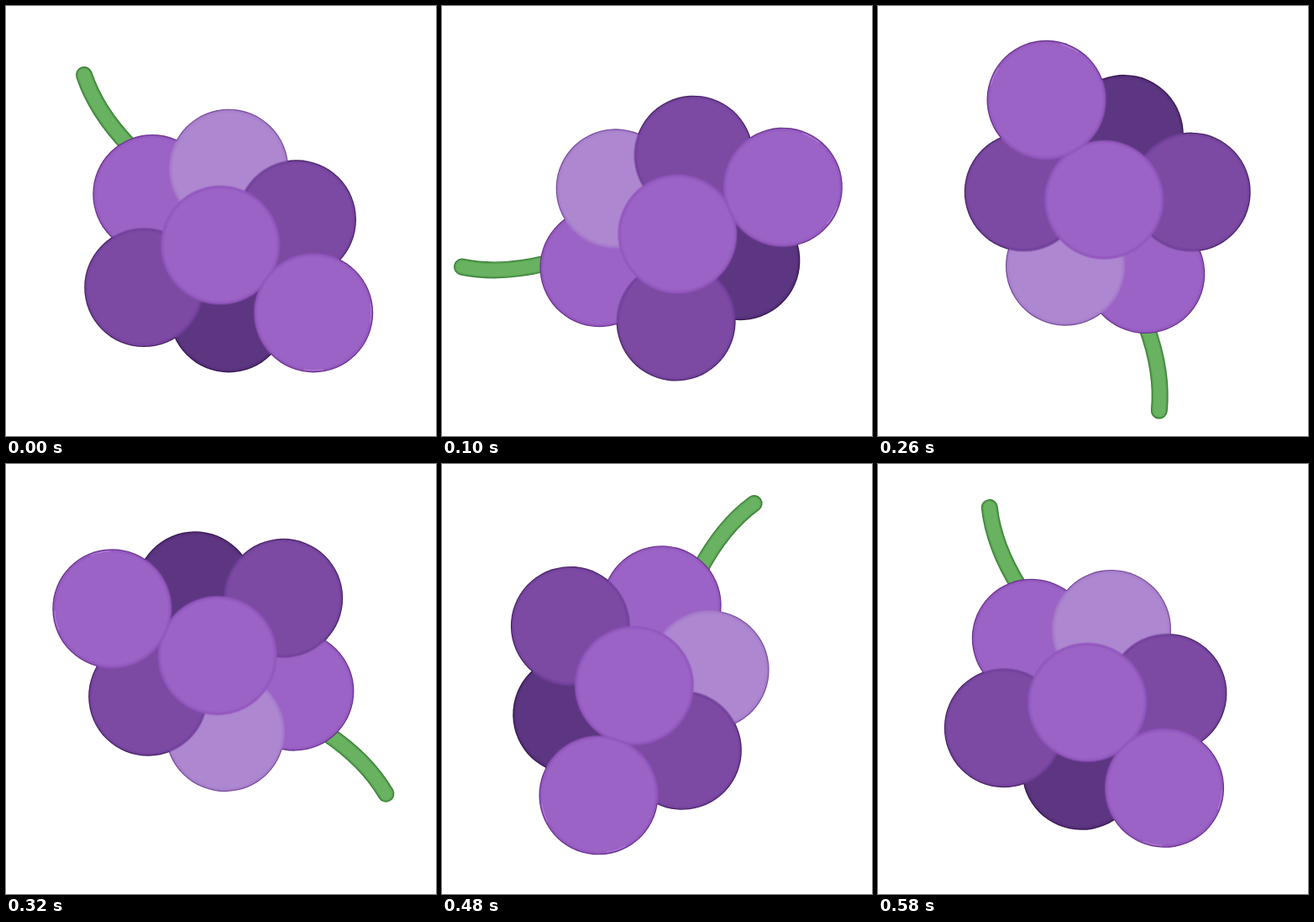
An HTML page with a canvas that plays this animation: 512x512 px, repeating every 600 ms.

```html
<!DOCTYPE html>
<html lang="en">
<head>
<meta charset="utf-8">
<title>Spinning grapes</title>
<style>
  html, body { margin: 0; width: 100%; height: 100%; overflow: hidden; background: #fff; }
  canvas { display: block; width: 100vw; height: 100vh; }
</style>
</head>
<body>
<canvas id="stage" width="512" height="512"></canvas>
<script>
const ctx = document.getElementById('stage').getContext('2d');

const LOOP = 600, STEP = 20;
const PIVOT = { x: 256.4, y: 256.2 };
const HUB = { x: -1.3, y: 28.4 };   // middle grape, relative to the pivot
const UNIT = 10.1, RADIUS = 71;

const tones = {
  light: { fill: '#ad87cf', rim: '#a57bcb', edge: '#75499a' },
  mid:   { fill: '#9b63c5', rim: '#9256be', edge: '#673089' },
  dark:  { fill: '#7c4aa3', rim: '#71409a', edge: '#472163' },
  deep:  { fill: '#5d3682', rim: '#532b77', edge: '#33174c' }
};

// Back to front, positions in grid units from the middle grape.
const grapes = [
  [-8, -6, tones.mid],
  [1, -9, tones.light],
  [9, -3, tones.dark],
  [1, 8, tones.deep],
  [-9, 5, tones.dark],
  [0, 0, tones.mid],
  [11, 8, tones.mid]
].map(([col, row, tone]) => ({ x: HUB.x + col * UNIT, y: HUB.y + row * UNIT, tone }));

function disc(x, y, r, paint) {
  ctx.fillStyle = paint;
  ctx.beginPath();
  ctx.arc(x, y, r, 0, Math.PI * 2);
  ctx.fill();
}

function drawStem() {
  ctx.lineCap = 'round';
  for (const [width, color] of [[20, '#3b7d37'], [17.6, '#56a24f'], [14.5, '#68b261']]) {
    ctx.lineWidth = width;
    ctx.strokeStyle = color;
    ctx.beginPath();
    ctx.moveTo(-163.4, -174.2);
    ctx.quadraticCurveTo(-149, -130.5, -109, -89);
    ctx.stroke();
  }
}

// Soft border, so neighbouring grapes blend where they overlap.
function drawGrape({ x, y, tone }) {
  const outer = RADIUS + 1;
  const shade = ctx.createRadialGradient(x, y, 0, x, y, outer);
  shade.addColorStop((RADIUS - 5) / outer, tone.fill);
  shade.addColorStop((RADIUS - 1.5) / outer, tone.rim);
  shade.addColorStop(1, tone.rim + '00');
  disc(x, y, outer, shade);
}

function clipToBunch(r) {
  ctx.beginPath();
  for (const { x, y } of grapes) {
    ctx.moveTo(x + r, y);
    ctx.arc(x, y, r, 0, Math.PI * 2);
  }
  ctx.clip();
}

function drawGlints({ x, y }) {
  ctx.lineCap = 'butt';
  ctx.lineWidth = 1.2;
  ctx.strokeStyle = '#b07bd6';
  for (const angle of [0, Math.PI / 2]) {
    ctx.beginPath();
    ctx.arc(x, y, RADIUS - 2.7, angle - 0.17, angle + 0.17);
    ctx.stroke();
  }
}

function draw(time) {
  const turn = Math.floor((time % LOOP) / STEP) * STEP / LOOP;
  ctx.fillStyle = '#fff';
  ctx.fillRect(0, 0, 512, 512);
  ctx.save();
  ctx.translate(PIVOT.x, PIVOT.y);
  ctx.rotate(-turn * Math.PI * 2);

  drawStem();
  // The dark edge stays visible only along the outer silhouette.
  for (const { x, y, tone } of grapes) disc(x, y, RADIUS, tone.edge);
  clipToBunch(RADIUS - 1.1);
  grapes.forEach(drawGrape);
  drawGlints(grapes[grapes.length - 1]);
  ctx.restore();
}

const start = performance.now();
function tick() {
  draw(performance.now() - start);
  requestAnimationFrame(tick);
}
tick();
</script>
</body>
</html>
```
